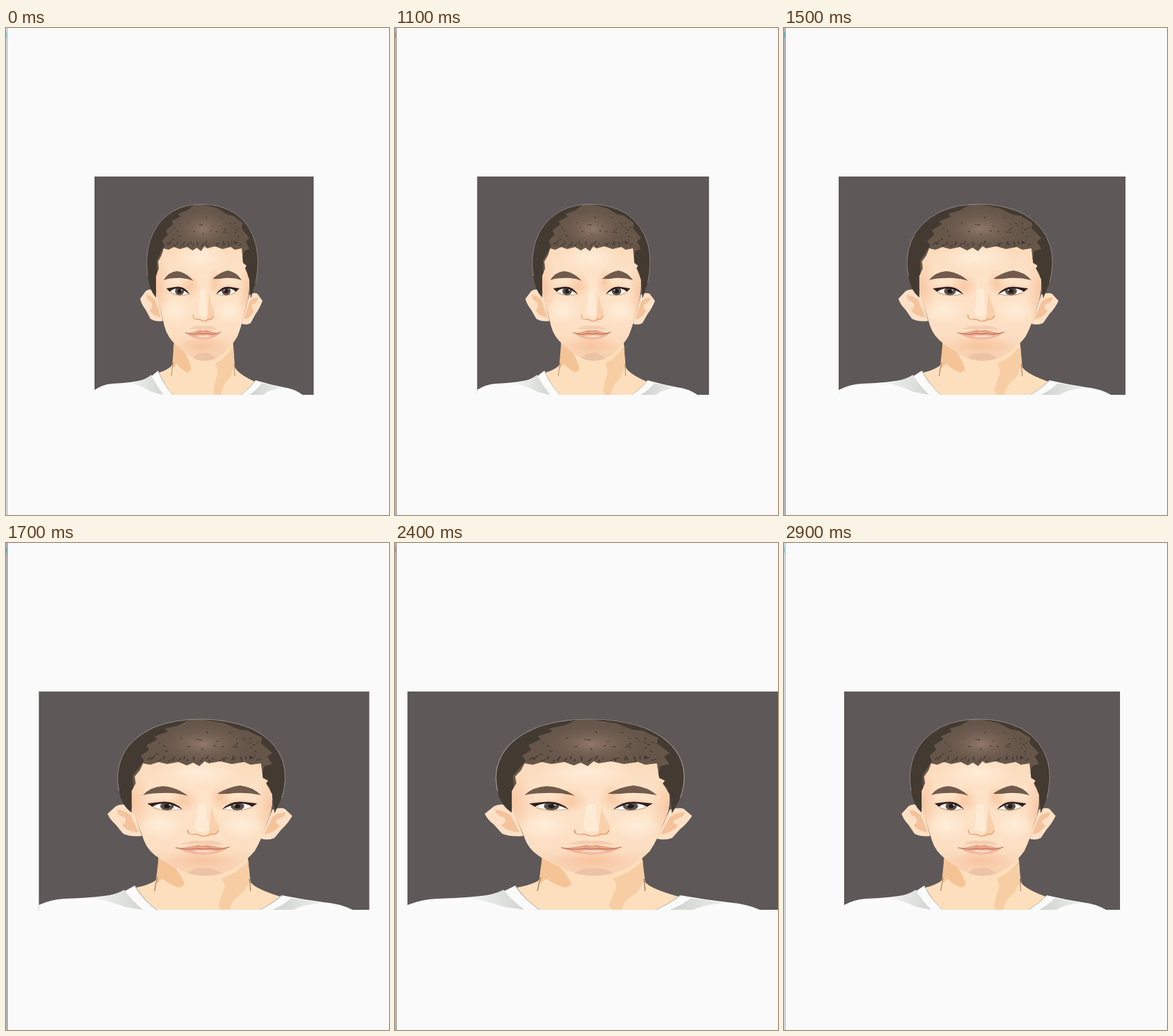
These frames come from a looping animation (554 by 705 pixels, 3000 ms). An HTML page:

```html
<!DOCTYPE html>
<html lang="en">
<head>
<meta charset="utf-8">
<title>Stretching portrait</title>
<style>
html, body { margin: 0; width: 100%; height: 100%; overflow: hidden; background: #fafafa; }
svg { display: block; width: 554px; height: 705px; }
</style>
</head>
<body>
<svg viewBox="0 0 554 705">
  <defs>
    <clipPath id="stage"><path d="M2 0H554V705H2Z"/></clipPath>
    <clipPath id="card"><path d="M128 215H445V531H128Z"/></clipPath>
    <clipPath id="scalp"><use href="#hair"/></clipPath>
    <clipPath id="skin"><use href="#face"/></clipPath>
    <linearGradient id="fold"><stop stop-color="#f1f2f1"/><stop offset="1" stop-color="#d2d4d2"/></linearGradient>
    <linearGradient id="foldR"><stop stop-color="#cfd1cf"/><stop offset="1" stop-color="#eceeec"/></linearGradient>
    <linearGradient id="skinTone" x2="0" y2="1">
      <stop stop-color="#fbd9b9"/><stop offset=".3" stop-color="#fde3c8"/>
      <stop offset=".75" stop-color="#fde0c4"/><stop offset="1" stop-color="#f6cdab"/>
    </linearGradient>
    <radialGradient id="blush"><stop stop-color="#f6b78d" stop-opacity=".6"/><stop offset="1" stop-color="#f6b78d" stop-opacity="0"/></radialGradient>
    <radialGradient id="glow"><stop stop-color="#ffefdc" stop-opacity=".9"/><stop offset="1" stop-color="#ffefdc" stop-opacity="0"/></radialGradient>
    <radialGradient id="shine"><stop stop-color="#907969"/><stop offset="1" stop-color="#705d4f" stop-opacity="0"/></radialGradient>
    <linearGradient id="lip" x2="0" y2="1"><stop stop-color="#e39c80"/><stop offset="1" stop-color="#f7c3a8"/></linearGradient>
  </defs>

  <g clip-path="url(#stage)">
    <g id="portrait" clip-path="url(#card)">
      <path fill="#5e5858" d="M128 215H445V531H128Z"/>

      <!-- neck -->
      <path fill="#fddfbd" d="M243 450L242 485Q239 493 221 499L238 531H342L360 512Q336 501 331 491L328 450Z"/>
      <path fill="#f5c496" d="M243 455L257 467Q265 480 268 494L263 499Q252 494 247 486L240 494Z"/>
      <path fill="#f7cda4" d="M329 460Q318 478 303 486Q309 497 304 507L300 525L303 531H311Q312 518 324 506L330 490Z"/>
      <path fill="none" stroke="#a57b5c" stroke-width=".8" d="M242 484Q240 493 239 504M330 486L331 504"/>

      <!-- shirt -->
      <path fill="#fafbfa" d="M128 524Q140 516 152 515Q192 513 208 506L220 496Q228 516 241 531H128Z"/>
      <path fill="url(#fold)" d="M180 514Q200 511 210 502Q217 517 228 531L211 527Q196 518 180 514Z"/>
      <path fill="#fafbfa" d="M361 510Q381 516 401 520Q417 522 429 531H340Q352 522 361 510Z"/>
      <path fill="url(#foldR)" d="M370 514L400 521Q382 523 372 531H352Q364 523 370 514Z"/>
      <path fill="none" stroke="#b9aea4" stroke-width=".7" d="M220 496Q228 516 241 531M361 510Q352 522 340 531"/>

      <!-- ears -->
      <path fill="#fde0c5" d="M217 381Q207 376 202 381L194 392Q196 400 202 408L209 421Q217 426 227 424Z"/>
      <path fill="#f4c39b" d="M203 386Q210 387 216 394L224 419Q213 417 208 409Q214 403 210 397Q203 394 203 386Z"/>
      <path fill="#fde0c5" d="M352 386Q360 382 364 385L371 395Q367 406 361 414L354 427Q348 431 341 428Z"/>
      <path fill="#f4c39b" d="M365 390Q356 390 352 397L344 422Q354 420 359 409Q353 405 357 400Q364 397 365 390Z"/>

      <!-- face -->
      <path id="face" fill="url(#skinTone)" d="M222 310L216 350Q215 371 219 392Q224 409 229 431Q233 447 245 458Q263 475 276 480Q288 484 302 479Q322 469 335 446Q342 428 347 404Q354 382 351 353L341 310Z"/>
      <g clip-path="url(#skin)">
        <ellipse cx="281" cy="332" rx="42" ry="22" fill="url(#glow)"/>
        <ellipse cx="219" cy="375" rx="18" ry="52" fill="url(#blush)"/>
        <ellipse cx="350" cy="382" rx="15" ry="52" fill="url(#blush)"/>
        <ellipse cx="267" cy="373" rx="15" ry="20" fill="url(#blush)"/>
        <ellipse cx="302" cy="369" rx="11" ry="20" fill="url(#blush)"/>
        <ellipse cx="245" cy="409" rx="23" ry="20" fill="url(#glow)"/>
        <ellipse cx="323" cy="409" rx="22" ry="20" fill="url(#glow)"/>
        <ellipse cx="285" cy="459" rx="38" ry="14" fill="url(#blush)"/>
        <path fill="#ecc3a5" d="M269 480Q277 469 285 471Q294 468 304 479L288 484Z"/>
      </g>
      <path fill="#f8c9a1" opacity=".7" d="M294 381Q295 395 300 407Q303 418 297 423Q287 428 274 423L282 425Q289 423 291 419Z"/>
      <path fill="#fff0df" d="M281 378H289Q288 397 292 415Q285 422 278 414Z" opacity=".65"/>
      <path fill="none" stroke="#df986f" stroke-width="1.1" d="M271 415Q270 422 276 422Q279 420 284 424Q290 425 293 421Q299 423 300 416"/>
      <path fill="#f3c6a7" d="M264 436Q278 428 285 432Q294 428 306 437L287 436Z" opacity=".75"/>

      <!-- mouth -->
      <path fill="url(#lip)" d="M261 442Q272 440 281 437Q285 439 289 437Q299 440 309 442Q301 450 286 452Q270 450 261 442Z"/>
      <path fill="none" stroke="#b86c54" d="M259 441Q271 445 280 442Q285 444 291 442Q301 445 311 440"/>
      <path fill="#ffe1cd" d="M275 446Q286 444 298 446Q287 449 275 446Z"/>

      <!-- brows and eyes -->
      <path fill="#705b4c" d="M228 365Q235 353 247 352Q260 353 271 366Q259 361 246 362Q235 362 228 365Z"/>
      <path fill="#705b4c" d="M299 363Q310 353 321 351Q333 353 341 365Q329 361 316 362Q307 364 299 363Z"/>
      <g id="eye">
        <ellipse cx="249" cy="379" rx="20" ry="10" fill="url(#blush)"/>
        <path fill="#fffaf5" d="M235 380Q250 371 265 385Q250 390 235 380Z"/>
        <ellipse cx="251" cy="381" rx="6.5" ry="6" fill="#59514c"/>
        <circle cx="251" cy="381" r="3" fill="#211c1b"/>
        <circle cx="254" cy="379" r="1.2" fill="#e5e2df"/>
        <path fill="#302020" d="M232 377Q238 376 244 375Q258 372 266 386Q255 377 247 377Q240 378 237 382Z"/>
        <path fill="none" stroke="#b28069" stroke-width=".7" d="M238 383Q249 390 265 385"/>
      </g>
      <use href="#eye" transform="matrix(-1 0 0 1 569.5 0)"/>

      <!-- hair -->
      <path id="hair" fill="#66564a" d="M217 390Q207 379 205 359Q201 333 208 309Q216 282 240 266Q259 255 283 255Q309 255 331 268Q355 285 362 316Q367 341 361 369L354 391L352 364L346 348L348 344L343 340L341 319L331 321L325 317L313 320L302 316L291 319L287 316L282 323L276 318L270 322L262 317L251 320L243 317L235 321L228 319L225 329L220 338L221 348L217 359Z"/>
      <g clip-path="url(#scalp)">
        <path fill="#433a32" d="M195 395V300Q214 258 276 253L262 264L249 269L252 273L239 280L242 284L231 293L234 299L226 308L229 315L218 337L220 393Z"/>
        <path fill="#433a32" d="M276 253Q350 253 370 320V395H351L350 355L341 339L344 323L352 320L347 309L352 304L341 290L342 282L329 272L320 270L306 261Z"/>
        <ellipse cx="285" cy="291" rx="44" ry="30" fill="url(#shine)"/>
        <g id="stubble" fill="none" stroke="#3d322b"/>
      </g>
      <path fill="none" stroke="#aaa49f" stroke-width=".6" d="M205 359Q201 333 208 309Q216 282 240 266Q259 255 283 255Q309 255 331 268Q355 285 362 316Q367 341 361 369"/>
    </g>
  </g>
  <path fill="#8ee8ee" d="M0 6H1V14H0Z"/>
  <path id="edge" d="M1 0H2V705H1Z"/>
</svg>
<script>
const byId = id => document.getElementById(id);
const portrait = byId('portrait'), edge = byId('edge');
const LOOP = 3000, STEP = 100, CENTER = 286.5;

// Time and stretch progress before easing
const KEYS = [[700, 0], [1100, .19], [1200, .2595], [1500, .501], [1800, .758],
  [2000, .9025], [2125, 1], [2400, .8066], [2900, .4515], [3000, .38]];

let seed = 7;
const random = () => (seed = seed * 16807 % 2147483647) / 2147483647;

function addStubble() {
  let dots = '', ticks = '';
  for (let i = 0; i < 40; i++) {
    const x = 235 + random() * 108, y = 272 + random() * 43;
    dots += `M${x} ${y}l${1 + random() * 2} ${random() * 3 - 1}`;
  }
  for (let i = 0; i < 22; i++) {
    const x = 230 + i * 5 + random() * 3;
    ticks += `M${x} ${313 + random() * 4}l${random() * 5 - 1} -${2 + random() * 5}`;
  }
  byId('stubble').innerHTML =
    `<path stroke-width="1.1" d="${dots}"/><path stroke-width="1.3" opacity=".75" d="${ticks}"/>`;
}

function stretch(t) {
  if (t <= KEYS[0][0]) return 1;
  const i = KEYS.findIndex(key => key[0] > t);
  const [t0, p0] = KEYS[i - 1], [t1, p1] = KEYS[i];
  return 1 + (p0 + (p1 - p0) * (t - t0) / (t1 - t0)) ** 1.7;
}

function draw(now) {
  const t = Math.floor(now % LOOP / STEP) * STEP;
  const s = stretch(t);
  portrait.setAttribute('transform', `matrix(${s} 0 0 1 ${CENTER * (1 - s)} 0)`);
  edge.setAttribute('fill', t >= 700 && t < 2900 ? '#505054' : '#a0a0a2');
  requestAnimationFrame(draw);
}

addStubble();
draw(performance.now());
</script>
</body>
</html>
```
